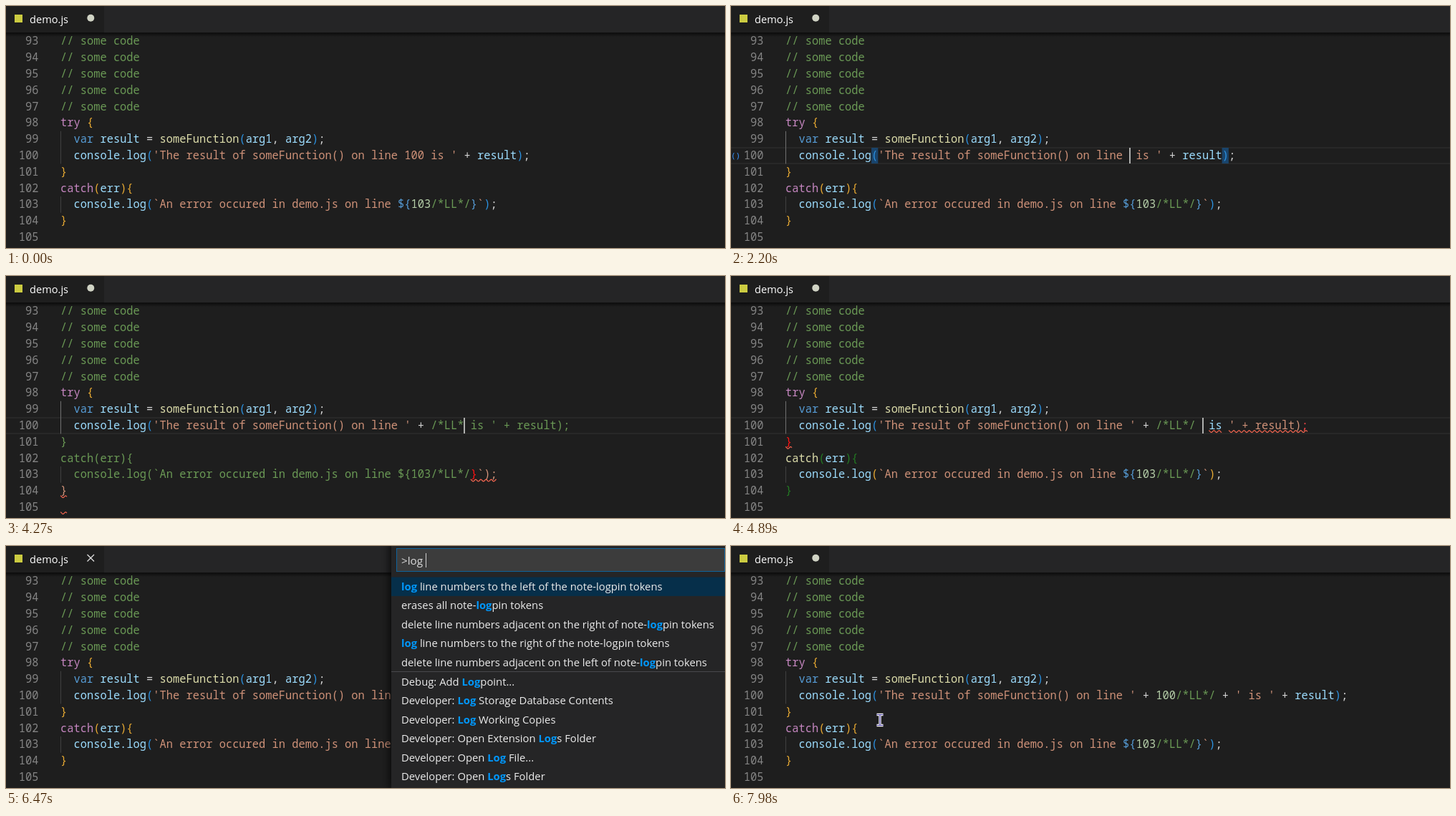
Write an HTML page with a canvas that moves like this. It is 1004 by 338 pixels and loops after 8 s.

```html
<!DOCTYPE html>
<html lang="en">
<head>
<meta charset="utf-8">
<style>
  html, body { margin: 0; width: 100%; height: 100%; overflow: hidden; background: #1e1e1e; }
  canvas { display: block; }
</style>
</head>
<body>
<canvas id="stage" width="1004" height="338"></canvas>
<script>
const ctx = document.getElementById('stage').getContext('2d');
const LOOP = 8000;
const LEFT = 76, CHAR = 9.237, ROW = 22.8;
const CODE_FONT = '15.4px "Noto Sans Mono", monospace';
const UI_FONT = '"Open Sans", sans-serif';

// One-letter colour keys used by the ^ markup in code lines
const COLORS = {
  k: '#c586c0', y: '#e6a832', l: '#2b91e0', w: '#d4d4d4', b: '#569cd6',
  v: '#9cdcfe', f: '#dcdcaa', s: '#ce9178', c: '#6a9955', n: '#b5cea8',
  g: '#237a23', r: '#ff1212', e: '#f44747'
};

const HEAD = "^w  ^vconsole.log^l(^s'The result of someFunction() on line ";
const INSERT = "' + /*LL*/ + '";
const INSERT_COL = 52;
const KEY_TIMES = [2310, 2480, 2700, 2900, 3290, 3560, 4040, 4110, 4270, 4480, 4700, 4900, 5090, 5270];
const DELETE_TIMES = [1490, 1590, 1680];

const CODE = {
  normal: {
    tail: "^s is '^w + ^vresult^l)^w;",
    101: '^y}',
    102: '^kcatch^y(^verr^y){',
    103: '^w  ^vconsole.log^l(^s`An error occured in demo.js on line ^b${^n103^c/*LL*/^b}^s`^l)^w;',
    104: '^y}'
  },
  broken: {
    tail: "^v is ^s' + result)^e;",
    101: '^r}',
    102: '^fcatch^g(^verr^g){',
    103: '^w  ^vconsole.log^y(^s`An error occured in demo.js on line ^b${^n103^c/*LL*/^b}^s`^y)^w;',
    104: '^g}'
  },
  comment: {
    tail: "^c is ' + result);",
    101: '^c}',
    102: '^ccatch(err){',
    103: '^c  console.log(`An error occured in demo.js on line ${103/*LL*/^r}^s`);',
    104: '^s}'
  }
};

const RECENT = [
  'log line numbers to the left of the note-logpin tokens',
  'erases all note-logpin tokens',
  'delete line numbers adjacent on the right of note-logpin tokens',
  'log line numbers to the right of the note-logpin tokens',
  'delete line numbers adjacent on the left of note-logpin tokens'
];
const LOG_COMMANDS = [
  'Debug: Add Logpoint...', 'Developer: Log Storage Database Contents',
  'Developer: Log Working Copies', 'Developer: Open Extension Logs Folder',
  'Developer: Open Log File...', 'Developer: Open Logs Folder'
];
const ALL_COMMANDS = [
  'Add Cursor Above', 'Add Cursor Below', 'Add Cursors to Bottom',
  'Add Cursors to Line Ends', 'Add Cursors to Top', 'Add Line Comment'
];
const LINE_COMMANDS = [
  'Add Cursors to Line Ends', 'Add Line Comment', 'Copy Line Down',
  'Copy Line Up', 'Delete Line', 'Insert Line Above'
];
const LOG_LINES = [RECENT[0], RECENT[3]];
const PALETTE = [
  [5770, '', [...RECENT, ...ALL_COMMANDS]],
  [6050, 'l', [...RECENT, ...LINE_COMMANDS]],
  [6470, 'log ', [...RECENT, ...LOG_COMMANDS]],
  [6560, 'log l', [...LOG_LINES, 'Developer: Set Log Level...', 'Developer: Show Log Listing']],
  [6810, 'log li', LOG_LINES],
  [6890, 'log lin', LOG_LINES],
  [6970, 'log line', LOG_LINES]
];
const PALETTE_CLOSE = 7230;

const between = (t, from, to) => t >= from && t < to;
const countUntil = (times, t) => times.filter(time => time <= t).length;
const colX = col => LEFT + col * CHAR;
const rowY = row => 197.6 + (row - 100) * ROW;

function rect(color, x, y, w, h) {
  ctx.fillStyle = color;
  ctx.fillRect(x, y, w, h);
}

function text(str, x, y, color, font) {
  ctx.font = font;
  ctx.fillStyle = color;
  ctx.fillText(str, x, y);
  return x + ctx.measureText(str).width;
}

function drawCode(row, markup) {
  const y = Math.round(rowY(row) + 16.4);
  ctx.textAlign = 'right';
  text(row, 45.5, y, '#858585', CODE_FONT);
  ctx.textAlign = 'left';
  let col = 0;
  for (const token of markup.split('^').slice(1)) {
    const str = token.slice(1);
    text(str, colX(col), y, COLORS[token[0]], CODE_FONT);
    col += str.length;
  }
}

function squiggle(row, col, length) {
  const y = rowY(row) + 19.5;
  ctx.beginPath();
  for (let x = 0; x <= length * CHAR; x++) {
    ctx.lineTo(colX(col) + x, y - 1.4 * Math.cos(x * Math.PI / 3.6));
  }
  ctx.strokeStyle = '#f0644f';
  ctx.lineWidth = 1.2;
  ctx.stroke();
}

function typedMarkup(n) {
  const str = INSERT.slice(0, n);
  return '^s' + str.slice(0, 1) + '^w' + str.slice(1, 4) +
    (n > 5 ? '^c' : '^w') + str.slice(4, 10) + '^w' + str.slice(10, 13) + '^s' + str.slice(13);
}

function drawEditor(t) {
  const typed = countUntil(KEY_TIMES, t);
  const digits = '100'.slice(0, 3 - countUntil(DELETE_TIMES, t));
  const numbered = t >= 7310;
  const mode = typed === 0 || typed === 14 ? 'normal' : between(typed, 6, 10) ? 'comment' : 'broken';
  const code = CODE[mode];
  const focused = between(t, 820, 5750);
  const caretCol = INSERT_COL + digits.length + typed;

  if (focused) {
    rect('#282828', 0, 197, 1004, 2);
    rect('#282828', 0, 219, 1004, 2);
  }
  rect(focused ? '#707070' : '#404040', 76, rowY(99), 1, 2 * ROW);
  rect('#404040', 76, rowY(103), 1, ROW);

  if (between(t, 820, 2310)) {
    for (const col of [13, caretCol + 14]) rect('#1a446b', colX(col), 198, CHAR, 22);
    text('()', 0, 213, '#3794ff', '11px "Noto Sans Mono", monospace');
  }

  for (let row = 93; row < 98; row++) drawCode(row, '^c// some code');
  drawCode(98, '^ktry ^y{');
  drawCode(99, '^w  ^bvar ^vresult ^w= ^fsomeFunction^l(^varg1^w, ^varg2^l)^w;');
  const middle = numbered
    ? typedMarkup(14).replace('^c', '^n100^c')
    : '^s' + digits + typedMarkup(typed);
  drawCode(100, HEAD + middle + code.tail);
  for (let row = 101; row < 105; row++) drawCode(row, code[row]);
  drawCode(105, '');

  if (between(t, 2530, 3830) || between(t, 4700, 5270)) {
    squiggle(100, caretCol + 1, 2);
    squiggle(100, caretCol + 4, 12);
    squiggle(101, 0, 1);
  } else if (between(t, 3880, 4700)) {
    squiggle(103, 62, 4);
    squiggle(104, 0, 1);
    squiggle(105, 0, 1);
  }

  if (focused && !between(t, 1910, 2200)) {
    rect('#aeafad', Math.round(colX(caretCol)), 198, 2, 22);
  }
}

function drawTabs(t) {
  rect('#252526', 0, 0, 1004, 38);
  rect('#1e1e1e', 0, 0, 137, 38);
  const shade = ctx.createLinearGradient(0, 37, 0, 43);
  shade.addColorStop(0, 'rgba(0,0,0,.65)');
  shade.addColorStop(1, 'rgba(0,0,0,0)');
  rect(shade, 0, 37, 1004, 6);

  rect('#cbcb41', 12, 12, 11, 11);
  text('demo.js', 33, 24, '#ffffff', '14.6px ' + UI_FONT);
  ctx.beginPath();
  if (between(t, 5750, 7310)) {
    ctx.moveTo(113.5, 12); ctx.lineTo(123, 21.5);
    ctx.moveTo(123, 12); ctx.lineTo(113.5, 21.5);
    ctx.strokeStyle = '#e0e0e0';
    ctx.lineWidth = 1.3;
    ctx.stroke();
  } else {
    ctx.arc(118.3, 16.7, 5, 0, 2 * Math.PI);
    ctx.fillStyle = '#d0d3c4';
    ctx.fill();
  }
}

function drawPalette(t) {
  const [, query, items] = PALETTE.filter(step => step[0] <= t).pop();
  const font = '14.8px ' + UI_FONT, step = 26.4;

  ctx.save();
  ctx.shadowColor = '#000';
  ctx.shadowBlur = 14;
  rect('#252526', 538, -10, 480, 59.5 + items.length * step);
  ctx.restore();

  rect('#0e639c', 545, 3, 459, 33);
  rect('#3c3c3c', 546, 4, 457, 31);
  const caretX = text('>' + query, 552, 26, '#dcdcdc', '15.3px ' + UI_FONT);
  if (!between(t, 6270, 6310)) rect('#d0d0d0', Math.round(caretX), 10, 1, 20);

  rect('#062f4a', 538, 43.5, 466, step);
  if (items.length > RECENT.length) rect('#48484c', 538, 175, 466, 1);

  const term = query.trim();
  items.forEach((item, i) => {
    const start = term ? item.search(new RegExp('\\b' + term, 'i')) : 0;
    const end = start + term.length;
    const belowSeparator = i >= RECENT.length ? 1 : 0;
    const y = Math.round(62 + i * step) + belowSeparator;
    let x = text(item.slice(0, start), 552, y, '#ebebeb', font);
    x = text(item.slice(start, end), x, y, '#0097fb', 'bold ' + font);
    text(item.slice(end), x, y, '#ebebeb', font);
  });
}

function drawPointer(x, y) {
  ctx.beginPath();
  for (const side of [-1, 1]) {
    ctx.moveTo(x + side * 4.5, y - 7.5);
    ctx.lineTo(x, y - 7.5);
    ctx.lineTo(x, y + 7.5);
    ctx.lineTo(x + side * 4.5, y + 7.5);
  }
  ctx.strokeStyle = '#ffffff';
  ctx.lineWidth = 3.4;
  ctx.stroke();
  ctx.strokeStyle = '#4b3f9e';
  ctx.lineWidth = 1.2;
  ctx.stroke();
}

function drawMouse(t) {
  const progress = (from, to) => Math.min(1, Math.max(0, (t - from) / (to - from)));
  if (between(t, 320, 1290)) {
    const enter = progress(320, 640), leave = progress(900, 1250);
    drawPointer(638 - 56 * enter + 8 * leave, 328 - 130 * enter + 71 * leave);
  } else if (t >= 7980) {
    drawPointer(208, 243);
  }
}

const began = performance.now();

function draw() {
  const t = (performance.now() - began) % LOOP;
  rect('#1e1e1e', 0, 0, 1004, 338);
  drawEditor(t);
  drawTabs(t);
  if (between(t, PALETTE[0][0], PALETTE_CLOSE)) drawPalette(t);
  drawMouse(t);
  requestAnimationFrame(draw);
}

draw();
</script>
</body>
</html>
```
